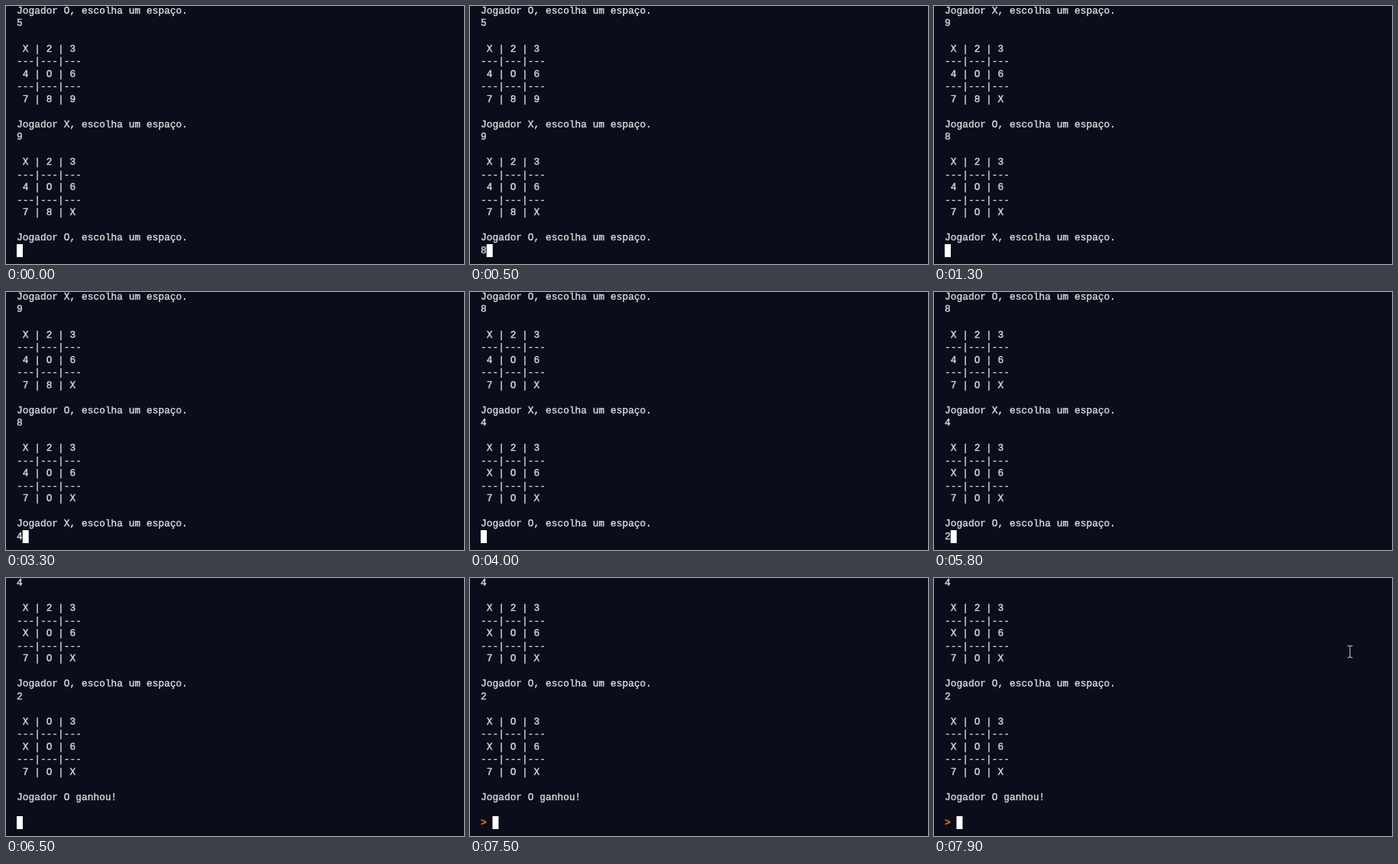
An HTML page that plays this animation: 600x338 px, repeating every 8000 ms.

```html
<!DOCTYPE html>
<html lang="pt">
<head>
<meta charset="utf-8">
<title>Jogo da velha</title>
<style>
  html, body {
    margin: 0;
    width: 100%;
    height: 100%;
    overflow: hidden;
    background: #0b0e1a;
  }
  #term {
    position: absolute;
    left: 14px;
    top: -1.1px;
    margin: 0;
    color: #d8d9dc;
    font: 12.88px/16.53px "Liberation Mono", "Courier New", monospace;
    -webkit-text-stroke: .4px;
    white-space: pre;
  }
  #caret {
    position: absolute;
    left: 13.8px;
    top: 312px;
    width: 8px;
    height: 17px;
    background: #fff;
  }
  #mark { color: #dc641e; font-weight: bold; }
  #beam {
    position: absolute;
    left: 541px;
    top: 88px;
    visibility: hidden;
  }
</style>
</head>
<body>
<pre id="term"><span id="text"></span><span id="mark"></span></pre>
<div id="caret"></div>
<svg id="beam" width="8" height="17" fill="none" stroke="#c4c4c8" stroke-width="1.1">
  <path d="M.5 .8H2.6L4 2L5.4 .8H7.5M4 2V15M.5 16.2H2.6L4 15L5.4 16.2H7.5"/>
</svg>
<script>
const LOOP = 8000, ROWS = 20, CHAR = 7.73;
const moves = [1, 5, 9, 8, 4, 2];

// [start ms, moves played, typed text]
const steps = [
  [0, 3, ""], [500, 3, "8"],
  [1300, 4, ""], [3300, 4, "4"],
  [4000, 5, ""], [5800, 5, "2"],
  [6500, 6, ""], [6600, 6, "> "]
];

// [start ms, vertical shift of the pointer]
const pointer = [[7800, -91], [7900, 0]];

const $ = id => document.getElementById(id);
const player = n => n % 2 ? "O" : "X";
const ask = n => `Jogador ${player(n)}, escolha um espaço.`;
const latest = (list, t) => list.filter(s => s[0] <= t).pop();

function board(count) {
  const cells = [..."123456789"];
  moves.slice(0, count).forEach((m, i) => cells[m - 1] = player(i));
  const row = r => " " + cells.slice(r * 3, r * 3 + 3).join(" | ");
  const rule = "---|---|---";
  return [row(0), rule, row(1), rule, row(2)];
}

function transcript(count) {
  const lines = [];
  for (let i = 0; i < count; i++) {
    lines.push(ask(i), String(moves[i]), "", ...board(i + 1), "");
  }
  if (count < moves.length) lines.push(ask(count));
  else lines.push("Jogador O ganhou!", "");
  return lines;
}

let shown;
function draw(now) {
  const t = now % LOOP;
  const step = latest(steps, t);
  if (step !== shown) {
    const [, count, typed] = step;
    const shell = typed[0] === ">";
    const lines = [...transcript(count), shell ? "" : typed];
    $("text").textContent = lines.slice(-ROWS).join("\n");
    $("mark").textContent = shell ? typed : "";
    $("caret").style.transform = `translateX(${typed.length * CHAR}px)`;
    shown = step;
  }
  const spot = latest(pointer, t);
  $("beam").style.visibility = spot ? "visible" : "hidden";
  if (spot) $("beam").style.transform = `translateY(${spot[1]}px)`;
}

function tick() {
  draw(performance.now());
  requestAnimationFrame(tick);
}
tick();
</script>
</body>
</html>
```
